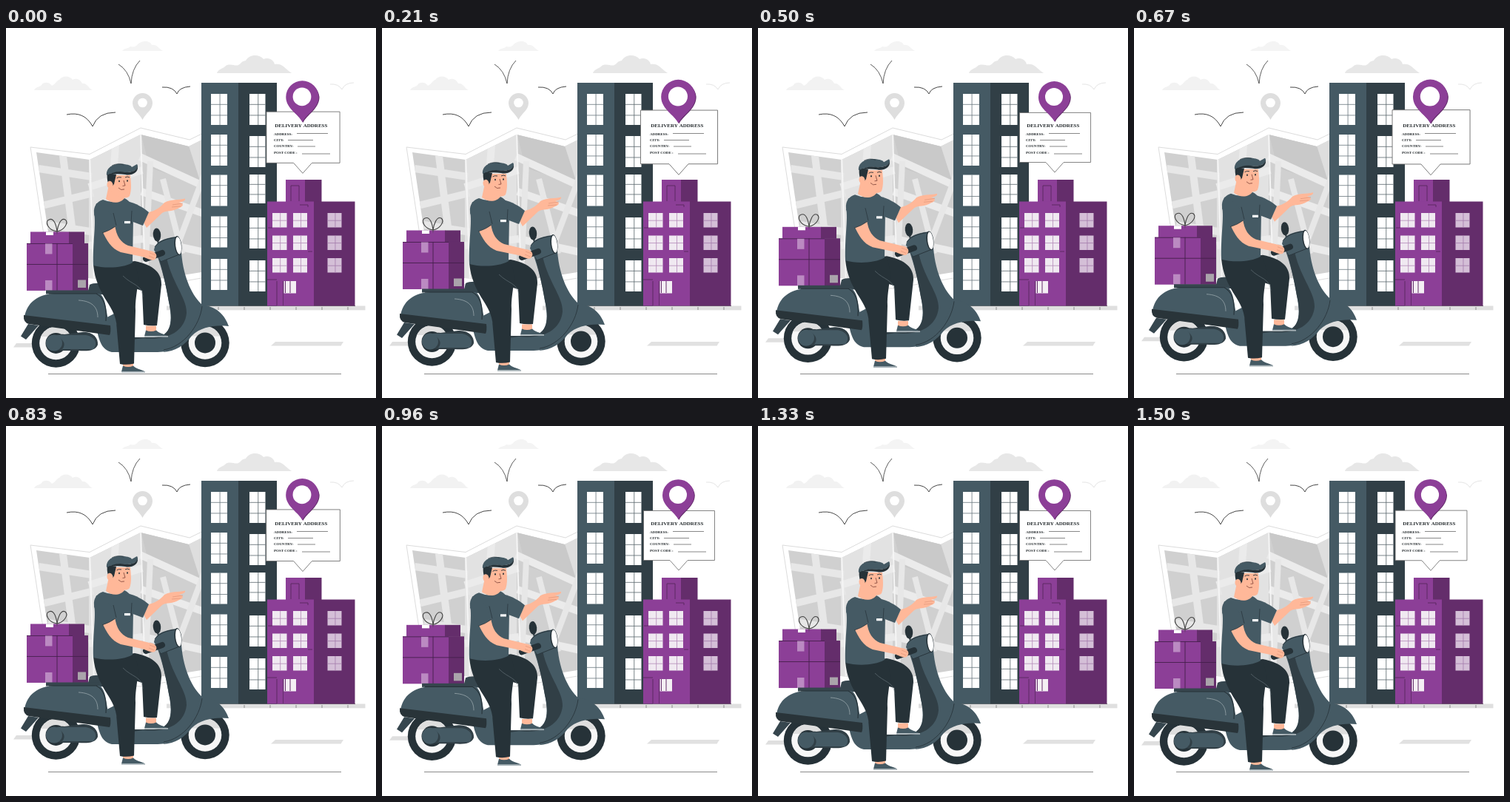
Animation, 500 px wide and 500 px high, one loop 1.54 s. Source, as an HTML page with a canvas:

```html
<!DOCTYPE html>
<html lang="en">
<head>
<meta charset="utf-8">
<title>Delivery</title>
<style>
html, body { margin: 0; width: 100%; height: 100%; overflow: hidden; background: #fff; }
canvas { display: block; width: 500px; height: 500px; }
</style>
</head>
<body>
<canvas id="stage"></canvas>
<script>
const LOOP = 1540;
const canvas = document.getElementById('stage');
const ctx = canvas.getContext('2d');
const ratio = window.devicePixelRatio || 1;
canvas.width = canvas.height = 500 * ratio;

const slate = '#455a64', shade = '#313f46', dark = '#263238', deep = '#36464e';
const purple = '#8c3f97', plum = '#642d6b', skin = '#ffb899';
const paths = new Map();

function path(d) {
  if (!paths.has(d)) paths.set(d, new Path2D(d));
  return paths.get(d);
}
function fill(color, d) {
  ctx.fillStyle = color;
  ctx.fill(path(d));
}
function line(color, d, width = 0.7) {
  ctx.strokeStyle = color;
  ctx.lineWidth = width;
  ctx.stroke(path(d));
}
function rect(color, x, y, w, h) {
  ctx.fillStyle = color;
  ctx.fillRect(x, y, w, h);
}
function oval(color, x, y, rx, ry = rx, turn = 0) {
  ctx.fillStyle = color;
  ctx.beginPath();
  ctx.ellipse(x, y, rx, ry, turn, 0, Math.PI * 2);
  ctx.fill();
}
function text(str, x, y, size) {
  ctx.fillStyle = '#252b2e';
  ctx.font = `bold ${size}px "Liberation Serif", serif`;
  ctx.fillText(str, x, y);
}
function scaled(x, y, k, draw) {
  ctx.save();
  ctx.translate(x, y);
  ctx.scale(k, k);
  ctx.translate(-x, -y);
  draw();
  ctx.restore();
}

function sky() {
  fill('#f2f2f2', 'M38 84C40 79 46 80 48 77C51 72 59 73 62 78C67 76 68 71 72 70C76 64 86 64 90 70C95 67 101 70 103 75C110 74 110 80 117 84Z');
  fill('#f4f4f4', 'M157 31C160 27 165 28 168 25C173 26 176 25 178 22C184 16 195 17 197 23C204 22 205 27 212 31Z');
  fill('#e7e7e7', 'M285 61C287 55 294 55 297 51C303 47 310 52 314 50C319 47 318 45 324 44C329 35 342 35 348 42C356 39 362 44 363 49C373 47 376 54 386 61Z');
  line('#333', 'M152 49Q165 57 169 75Q170 55 181 44', 0.8);
  line('#333', 'M82 117Q106 112 117 133Q124 114 148 114M211 80Q226 79 231 89Q234 80 249 79', 0.9);
  line('#d8d8d8', 'M438 76Q449 75 454 83Q458 74 470 74');
  fill('#dedede', 'M184.5 124C181 116 171 111 171 101.500A13.500 13.500 0 0 1 198 101.500C198 111 188 116 184.500 124Z');
  oval('#fff', 184.5, 101, 6.3);
}

function map() {
  const sheet = 'M33 161L113 170.500L182 135L248 151L285 133V342L264 338L182 352L112 347L61 345Z';
  fill('#fff', sheet);
  line('#dcdcdc', sheet, 1);
  ctx.save();
  ctx.clip(path('M41 168L113 178L182 144L247 160L285 141V333L264 330L182 343L112 338L66 336Z'));
  rect('#d0d0d0', 30, 130, 260, 220);
  fill('#e2e2e2', 'M112 170L182 140V350H112Z');
  fill('#c9c9c9', 'M182 142L247 159L264 212L194 189Z');
  fill('#dedede', 'M247 159L285 140V212H264Z');
  line('#e7e7e7', 'M44 190L116 201M49 240L118 223M57 266L120 276M76 165L98 340', 10);
  line('#ebebeb', 'M112 215L184 192M112 294L185 285M148 158L135 345M181 174L266 213M183 221L268 251M185 285L268 303', 10);
  line('#e7e7e7', 'M212 204L238 305M269 195L223 317M195 180L188 335', 8);
  line('#f5f5f5', 'M113 170L119 345M182 140L188 345', 2);
  ctx.restore();
}

function pane(x, y, w, h, glass, bars) {
  rect(glass, x, y, w, h);
  ctx.fillStyle = bars;
  ctx.fillRect(x + w * 0.53, y, 0.8, h);
  return (...rows) => rows.forEach(r => rect(bars, x, y + h * r, w, 0.8));
}

function tower() {
  rect(slate, 264, 74, 50, 301.5);
  rect(shade, 314, 74, 52, 301.5);
  [89, 144, 198.5, 254.5, 312].forEach((y, i) => {
    const side = [89, 146, 198, 256, 314][i];
    pane(277, y, 22, 42, '#fff', '#69777e')(0.33, 0.68);
    pane(329, side, 21.5, i === 2 ? 39 : 42, '#fff', '#59666c')(0.33, 0.68);
  });
}

function house() {
  rect(purple, 378, 205, 26, 30);
  rect(plum, 404, 205, 22.5, 30);
  rect(purple, 353, 234.5, 63, 141);
  rect(plum, 416, 234.5, 55.5, 141);
  line('#512456', 'M385 234V213H396V234M397 239H408V242M366 375V342M353 340H366M354 270H360M408 302H414', 0.8);
  for (const y of [250, 280.5, 311]) {
    pane(360, y, 19.5, 19.5, '#f0e9f1', '#b48bb9')(0.5);
    pane(388, y, 19, 19.5, '#f0e9f1', '#b48bb9')(0.5);
    pane(434.5, y, 19, 19.5, '#d4bfd7', '#a47bab')(0.5);
  }
  rect('#f4eff4', 375.5, 342, 16.5, 16.5);
  line(plum, 'M374.5 375V342M377.500 342V358M384 342V358', 1);
}

function ground() {
  rect('#dfdfdf', 217, 375.5, 268.5, 5.8);
  line('#555', 'M264 375.500H472', 0.8);
  line('#777', 'M287 377V381M322 377V381M357 377V381M392 377V381M427 377V381M462 377V381', 0.8);
  fill('#e1e1e1', 'M364 424H456L452.500 429.500H358Z');
  line('#6d6d6d', 'M57 467.500H453', 0.8);
}

function card(k) {
  scaled(401, 155, k, () => {
    const outline = 'M353.500 114.500H449.500V181.500H413L401 195L389 181.500H353.500Z';
    fill('#fff', outline);
    line('#666', outline, 0.8);
  });
  scaled(400.5, 99, k, () => {
    fill(plum, 'M401.500 127C397 117 380 109 380 93.500A21.500 21.500 0 0 1 422.800 93.500C422.800 109 406 117 401.500 127Z');
    fill(purple, 'M400.500 126.500C396 116 379 109 379 93.500A21.400 21.400 0 0 1 421.800 93.500C421.800 109 405 116 400.500 126.500Z');
    oval('#fff', 400, 93, 12);
  });
  text('DELIVERY ADDRESS', 363.2, 134, 7);
  text('ADDRESS:', 362, 144.5, 5);
  text('CITY:', 362, 153, 5);
  text('COUNTRY:', 362, 161.3, 5);
  text('POST CODE :', 362, 170, 5);
  line('#555', 'M393 142.500H435M381 151.500H415M394 160H418M400 170H438');
}

function boxes() {
  rect(purple, 33, 275.5, 52.5, 16);
  rect(plum, 85, 275.5, 21, 16);
  rect(purple, 28, 291, 62.5, 64);
  rect(plum, 90, 291, 21, 64);
  line('#45204b', 'M28 319.500H111M69 291V355M28 291.500H90', 0.9);
  rect('#bb8ac2', 53, 291.5, 9.5, 14);
  rect('#bb8ac2', 53, 341, 9.5, 14);
  rect('#aaa4ab', 97, 340.5, 11, 10.5);
  rect('#fff', 54, 275.5, 10, 4.5);
  line('#444', 'M69 275C56 273 52 261 58 259C65 256 68 267 69 275C70 267 74 256 80 259C85 263 79 273 69 275', 1.1);
}

function wheel(x, y) {
  oval(dark, x, y, 32.7);
  oval('#f7f7f7', x, y, 22.3);
  ctx.save();
  ctx.beginPath();
  ctx.rect(x - 32, y - 23, 64, 14);
  ctx.clip();
  oval('#dedede', x, y, 22.3);
  ctx.restore();
  oval(dark, x, y, 14);
}

function scooter() {
  fill('#dfdfdf', 'M14 426H37V431.500H10Z');
  fill(deep, 'M30 400L44 402L27 421L20 416.500Z');
  wheel(67.5, 426);
  wheel(269, 425.5);
  fill(shade, 'M62 425C62 416 68 413 79 414L103 411C117 410 125 419 124 428C121 436 111 437 98 436H77C67 436 62 432 62 425Z');
  oval(slate, 65, 425.5, 11);
  fill(slate, 'M68 415H108C120 417 125 426 118 434H76Q84 425 68 415Z');

  fill(slate, 'M204 307L237 304C240 340 253 363 265 374C262 400 240 438 205 438H143C128 435 125 420 121 399L148 385L152 418H200C225 417 225 394 220 370C216 346 211 326 204 307Z');
  fill(shade, 'M206 309L216 305C222 342 245 365 244 385C242 408 221 423 185 419L152 424V418H200C225 417 226 394 220 370C216 346 211 326 206 309Z');
  fill(slate, 'M262 374.500C283 374 296 388 301 403C284 401 263 404 251 416C241 429 229 437 212 438C240 426 256 402 262 374.500Z');
  line(dark, 'M265 376C262 402 240 431 213 435', 0.8);

  fill(deep, 'M110 359L113 347C119 343 139 345 154 349L160 362Z');
  rect(deep, 54, 354.5, 85, 5);
  fill(slate, 'M25 391C28 371 43 360 65 359H127C137 368 134 385 141 404Z');
  line(dark, 'M58 359H122C134 365 136 382 135 396', 1.1);
  line('#9aa7ad', 'M98 368C116 369 124 377 124 391', 0.8);
  fill('#293439', 'M24 388L141 402Q142 411 140 415L31 400Q23 398 24 388Z');
}

function handlebar() {
  line(dark, 'M205 287Q206 295 212 299', 2);
  oval(dark, 204, 279.5, 5.2, 9, -0.1);
  fill(slate, 'M200 300C202 288 214 284 230 282L237 305L210 316Z');
  line(dark, 'M201 296C207 288 216 285 229 283M209 316L237 305', 0.9);
  oval(dark, 232.5, 294, 4.8, 13, -0.12);
  oval('#fff', 233, 294, 3.8, 11.8, -0.12);
  ctx.lineCap = 'round';
  line(dark, 'M189 312L211 304', 8);
  ctx.lineCap = 'butt';
}

function shoe(x, y) {
  rect(skin, x + 2, y - 15, 14, 9);
  ctx.save();
  ctx.translate(x, y);
  fill(slate, 'M0 -1L2 -9Q9 -6 16 -9C21 -4 28 -4 32 -1Z');
  rect('#a9b4b9', 0, -1.5, 32, 1.8);
  ctx.restore();
}

function legs() {
  shoe(187, 417.5);
  fill(dark, 'M145 319L174 315C200 320 211 332 210 347L204 402Q194 403 186 401L184 355L152 345Z');
  shoe(156, 465.5);
  fill(dark, 'M118 320L172 316C185 337 174 355 175 382L173 453.500Q163 456 154 454L149 398C146 374 122 361 118 320Z');
  line('#6c7a80', 'M158 335C171 348 183 346 185 363', 0.6);
}

function arms() {
  fill(skin, 'M186 263L193 249C202 247 209 242 214 236C222 231 233 233 242 230.500C243 234 237 235 234 236C241 237 240 241 234 243C225 249 217 246 211 250L190 270Z');
  line('#d98f73', 'M225 239L239 237M224 242L236 241', 0.6);
  fill(slate, 'M162 234C176 236 187 244 193 249L185 267L169 261Z');
  fill(slate, 'M131 232Q147 239 160 230C169 234 173 243 172 256L171 317C157 325 133 325 118 321C117 290 122 265 119 250C118 240 124 234 131 232Z');
  line(dark, 'M170 247L169 265M145 250L149 267', 0.7);
  rect('#fff', 160, 261, 8, 3.2);
  fill(skin, 'M130 274L147 266C149 281 155 290 165 294L194 301C203 302 206 308 201 313C197 315 193 312 184 309L155 303C142 298 136 287 130 274Z');
  line('#d98f73', 'M194 304L202 307M193 308L200 311', 0.6);
  fill(slate, 'M122 237C134 237 143 252 148 268Q140 274 130 277L119 252Z');
  line(dark, 'M148 268Q140 274 130 277', 0.7);
}

function head() {
  fill(skin, 'M139 212L135 231C143 238 155 237 160 230L157 222Z');
  fill(skin, 'M142 199H168C169 210 170 219 167 227C163 232 152 229 147 225Q138 222 142 199Z');
  fill(dark, 'M137 196L149 198L146 211L142 216C137 211 136 203 137 196Z');
  oval(skin, 140.5, 212, 4, 5.2, -0.2);
  fill(slate, 'M136 199C135 187 148 182 160 184C167 185 169 186 170 188L177 184C181 190 173 195 162 195Q149 193 136 199Z');
  fill(dark, 'M137 199Q149 192 162 195C171 195 177 192 178 187C179 196 169 200 161 198Q148 196 137 199Z');
  line(dark, 'M143 186Q151 182 159 185', 0.6);
  oval(dark, 153, 207, 0.9, 1.3);
  oval(dark, 164, 206.5, 0.9, 1.3);
  line(dark, 'M149.500 203Q152 201 156 202M161 202Q164 200 167 202', 0.9);
  line('#7b4136', 'M159 206L161 213L157.500 213.500M152 216Q155 220 160 218', 0.8);
}

function pulse(t, center) {
  const gap = Math.abs(t - center);
  const away = Math.min(gap, LOOP - gap) / 220;
  return away < 1 ? Math.cos(away * Math.PI / 2) ** 2 : 0;
}

function draw(now) {
  const t = now % LOOP;
  const lift = 4.2 * (1 - Math.cos(2 * Math.PI * (t + 40) / LOOP));
  ctx.setTransform(ratio, 0, 0, ratio, 0, 0);
  rect('#fff', 0, 0, 500, 500);
  sky();
  map();
  ground();
  tower();
  house();
  card(1 + 0.11 * pulse(t, 140) + 0.1 * pulse(t, 705));

  ctx.save();
  ctx.translate(0, -lift);
  boxes();
  scooter();
  handlebar();
  legs();
  arms();
  head();
  ctx.restore();
}

const start = performance.now();
function tick() {
  draw(performance.now() - start);
  requestAnimationFrame(tick);
}
tick();
</script>
</body>
</html>
```
